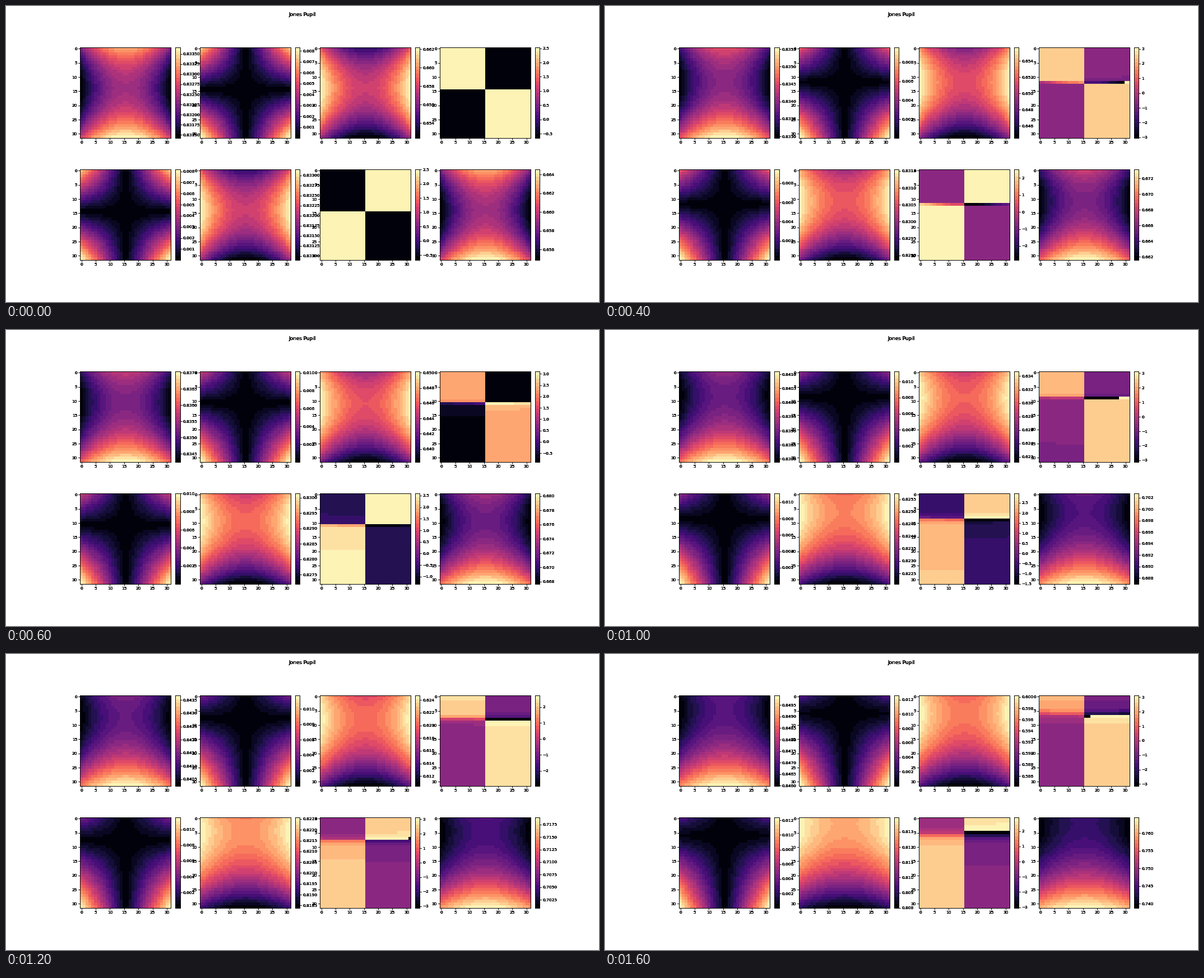
Recreate the animation shown at these times as a matplotlib script. Size 1058 by 529 pixels, loop 1.8 s.

```python
import numpy as np
import matplotlib.pyplot as plt
from matplotlib.animation import FuncAnimation
from matplotlib.axes import Axes
from matplotlib.colors import ListedColormap

W, H, DPI = 1058, 529, 52.9
FRAMES, INTERVAL = 9, 200
LAST = FRAMES - 1
PASSES = 4          # repeated drawing gives labels and frames their heavy look

row, col = np.mgrid[0:32, 0:32]
x = col - 15.5


def saddle(sign, gain, drift, level, flatten=0, swell=0):
    """Co-polarised amplitude: a saddle whose centre drifts upwards."""
    def field(k):
        dy = row - 14 + drift * k
        shape = dy ** 2 - (1 - flatten * k) * x ** 2
        growth = 1 + swell * (k / LAST) ** 4
        return np.polyval(level, k) + sign * gain * growth * shape
    return field


def leakage(k, turn=1, curve=.036):
    """Complex cross term: zero column in the middle, a rising zero row."""
    centre = 14.6 - 1.35 * k + curve * k ** 2
    width = .01 + .955 * (k / LAST) ** 2.3
    return x * (row - centre + .12 * x ** 2 / 240 + 1j * turn * width)


def cross(gain):
    return lambda k: gain * np.abs(leakage(k))


def phase(turn, curve, start, shift):
    def field(k):
        offset = start + shift * (1 - (1 - k / LAST) ** 2)
        return np.angle(np.exp(1j * offset) * leakage(k, turn, curve))
    return field


panels = [
    saddle(1, 4.25e-6, 1.15, [1.756e-4, 4.16e-4, .83244]),
    cross(3.25e-5),
    saddle(-1, 1.86e-5, 1.0, [-7.46e-4, -1.77e-3, .65775]),
    phase(1, .036, 2.51, -.19),
    cross(3.2e-5),
    saddle(-1, 4.25e-6, 1.55, [-1.4e-5, -1.32e-4, -4.55e-4, .83213],
           flatten=.025, swell=.33),
    phase(-1, .033, -.65, -.07),
    saddle(1, 1.83e-5, 1.55, [6e-5, 6.14e-4, 1.77e-3, .65929],
           flatten=.025, swell=.33),
]


class InkedAxes(Axes):
    """Axes that draw their frame, ticks and labels several times over."""

    def draw(self, renderer):
        super().draw(renderer)
        for _ in range(PASSES - 1):
            for part in (*self.spines.values(), self.xaxis, self.yaxis):
                part.draw(renderer)


plt.rcParams["font.family"] = "DejaVu Sans"
fig = plt.figure(figsize=(W / DPI, H / DPI), dpi=DPI, facecolor="white")
for _ in range(PASSES):
    fig.text(.5, .98, "Jones Pupil", fontsize=12, ha="center", va="top")


def add_axes(left, top, width, height):
    box = [left / W, 1 - (top + height) / H, width / W, height / H]
    return fig.add_axes(box, axes_class=InkedAxes)


LEVELS = 24
cmap = ListedColormap(plt.get_cmap("magma")((np.arange(LEVELS) + .5) / LEVELS))
SIZE, PAD = 162.2, 7.94
images = []
for i, field in enumerate(panels):
    left, top = 132.25 + 213.9 * (i % 4), 73.8 + 218 * (i // 4)
    ax = add_axes(left, top, SIZE, SIZE)
    im = ax.imshow(field(0), cmap=cmap, interpolation="nearest", aspect="auto")
    bar = fig.colorbar(im, cax=add_axes(left + SIZE + PAD, top, SIZE / 20, SIZE))
    bar.formatter.set_useOffset(False)
    images.append(im)


def update(k):
    for im, field in zip(images, panels):
        z = field(k)
        im.set_data(z)
        im.set_clim(z.min(), z.max())
    return images


anim = FuncAnimation(fig, update, frames=FRAMES, interval=INTERVAL,
                     repeat=True, repeat_delay=0, blit=False)
plt.show()
```
